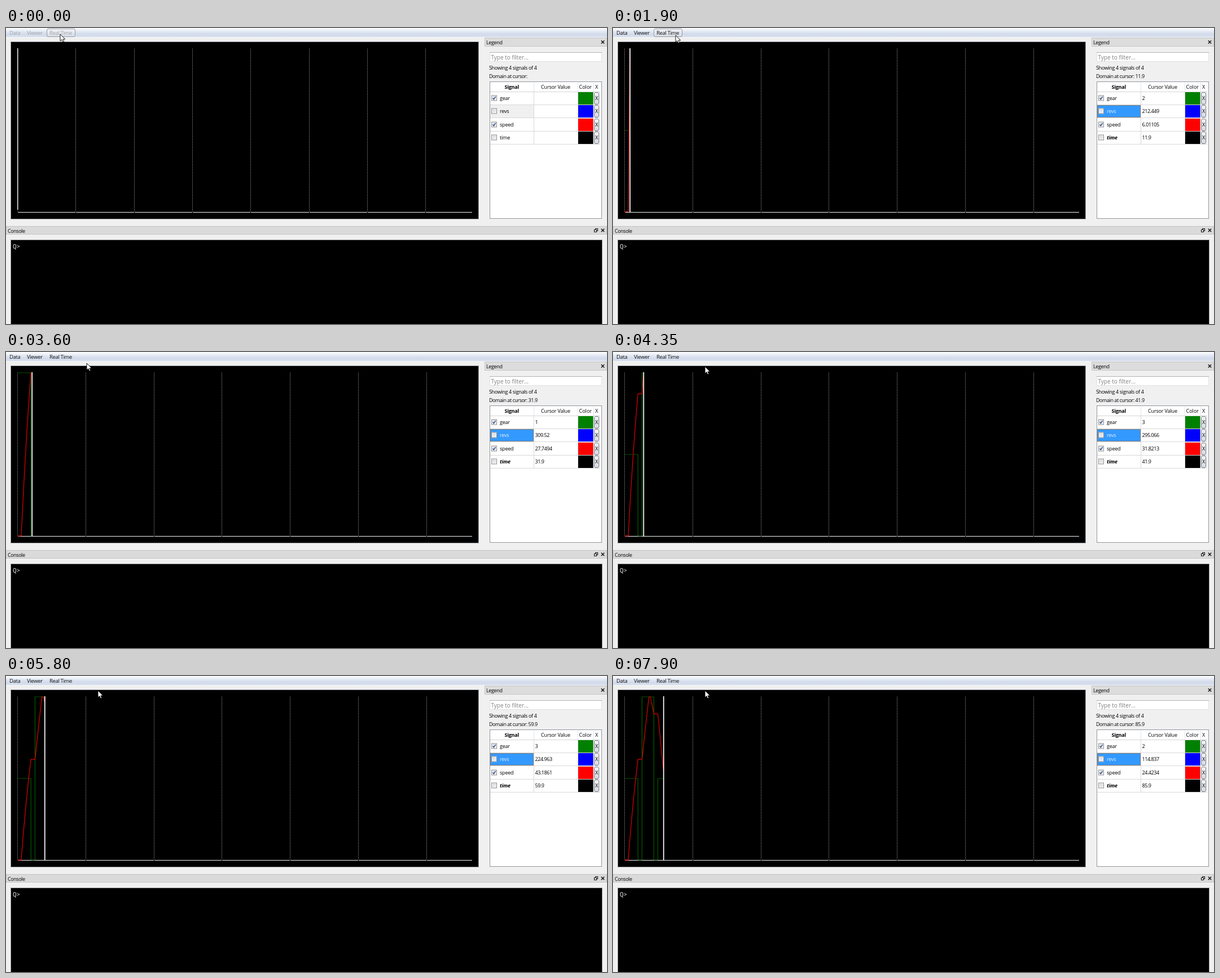
Recreate the animation shown at these times as an HTML page with a canvas. Size 1065 by 526 pixels, loop 8000 ms.

```html
<!DOCTYPE html>
<html lang="en">
<head>
<meta charset="utf-8">
<title>Real time signal viewer</title>
<style>
  html, body { margin: 0; width: 100%; height: 100%; overflow: hidden; background: #f0f0f0; }
  canvas { display: block; }
</style>
</head>
<body>
<canvas id="stage" width="1065" height="526"></canvas>
<script>
const ctx = document.getElementById('stage').getContext('2d');
const LOOP = 8000;
const UI = '"Open Sans", "Noto Sans", sans-serif';
const PLOT = { left: 20.5, right: 826, top: 37, bottom: 327, unit: 0.805 };

const clamp = (v, lo, hi) => Math.min(hi, Math.max(lo, v));

// Speed gained between two times at a given rate that fades off linearly.
function gain(t, from, to, rate, fade = 0) {
  const s = clamp(t, from, to) - from;
  return rate * s - fade * s * s;
}

// Two spells of acceleration, each followed by coasting, then two of braking.
function speed(t) {
  const driven = gain(t, 8, 29.5, 1.596831, 0.01424)
    + gain(t, 38.5, 53.65, 1.214571, 0.00498875)
    - gain(t, 57, 64.5, 0.627274)
    - gain(t, 73.2, 99, 1.250173);
  return Math.max(driven, 0.0033917 * t);
}

// The gear passes through 1 during each change.
function gear(t) {
  if (t < 29.5) return 2;
  if (t < 38.4) return 1;
  if (t < 64.5) return 3;
  return t < 73.2 ? 1 : 2;
}

const REV_KEYS = [[0, 104.719], [23.9, 321.084], [41.9, 295.066], [49.9, 308.646], [69.9, 141.279], [85.9, 114.837]];
function revs(t) {
  const i = REV_KEYS.findIndex(([end], k) => k > 0 && t <= end);
  const [t0, v0] = REV_KEYS[i - 1], [t1, v1] = REV_KEYS[i];
  return v0 + (v1 - v0) * (t - t0) / (t1 - t0);
}

// Time of the newest sample, or null before the feed starts; each update adds two units.
function feedTime(ms) {
  const n = Math.floor((ms + 24 - 2395) / 162.25);
  return n < -8 ? null : 17.9 + 2 * n;
}

function pointerAt(ms) {
  const glide = (from, to) => clamp((ms - from) / (to - from), 0, 1);
  const down = glide(300, 900), back = glide(1300, 1950), away = glide(3450, 3700);
  return [
    Math.round(96 + 4 * down + 12 * back + 51 * away),
    Math.round(11 + 13 * down - 12 * back + 14 * away)
  ];
}

function rect(x, y, w, h, fill, stroke) {
  if (fill) { ctx.fillStyle = fill; ctx.fillRect(x, y, w, h); }
  if (stroke) { ctx.strokeStyle = stroke; ctx.lineWidth = 1; ctx.strokeRect(x + 0.5, y + 0.5, w - 1, h - 1); }
}

function line(points, color, width = 1) {
  ctx.strokeStyle = color;
  ctx.lineWidth = width;
  ctx.beginPath();
  points.forEach(([x, y]) => ctx.lineTo(x, y));
  ctx.stroke();
}

function text(str, x, y, { size = 9, color = '#000', style = '', gap = -0.35, family = UI } = {}) {
  ctx.font = `${style} ${size}px ${family}`;
  ctx.letterSpacing = gap + 'px';
  ctx.fillStyle = color;
  ctx.fillText(str, x, y);
}

function gradient(y0, y1, ...colors) {
  const g = ctx.createLinearGradient(0, y0, 0, y1);
  colors.forEach((c, i) => g.addColorStop(i / (colors.length - 1), c));
  return g;
}

function button(x, y, w, h, border) {
  ctx.beginPath();
  ctx.roundRect(x + 0.5, y + 0.5, w - 1, h - 1, 2.5);
  ctx.fillStyle = gradient(y, y + h, '#f3f4f7', '#e4e7ee', '#d4d9e3');
  ctx.fill();
  ctx.strokeStyle = border;
  ctx.lineWidth = 1;
  ctx.stroke();
}

function closeMark(x, y) {
  line([[x - 2.7, y - 2.7], [x + 2.7, y + 2.7]], '#111', 1.4);
  line([[x + 2.7, y - 2.7], [x - 2.7, y + 2.7]], '#111', 1.4);
}

function drawMenu(active, hover) {
  rect(0, 0, 1065, 16, gradient(0, 16, '#ffffff', '#e6ebf5', '#d3dcec', '#d6deee'));
  rect(0, 16, 1065, 1, '#f4f5f8');
  if (hover) button(72, 1, 51, 15, '#979ba3');
  const look = { size: 9.5, color: active ? '#111' : '#a3a5a9' };
  text('Data', 6, 12, look);
  text('Viewer', 37, 12, look);
  text('Real Time', 77, 12, look);
}

function trace(signal, now, color, width) {
  const values = Array.from({ length: Math.round(now * 10) + 1 }, (_, i) => signal(i / 10));
  const min = Math.min(...values), span = Math.max(...values) - min;
  const scaleY = v => PLOT.bottom - (PLOT.bottom - PLOT.top) * (span ? (v - min) / span : 0.5);
  line(values.map((v, i) => [PLOT.left + i / 10 * PLOT.unit, scaleY(v)]), color, width);
}

function drawPlot(now) {
  rect(8, 24, 830, 316, '#000', '#a0a3a8');
  rect(21, 327, 805, 1, '#f4f4f4');
  const step = now === null ? 103.3 : 120.75;
  ctx.setLineDash([1, 1.5]);
  for (let x = PLOT.left; x < PLOT.right - 5; x += step) {
    const px = Math.floor(x) + 0.5;
    line([[px, PLOT.top], [px, PLOT.bottom]], '#b4b4b4');
    rect(px - 0.5, PLOT.bottom, 1, 1, '#000');
  }
  ctx.setLineDash([]);
  if (now === null) {
    rect(20, 36, 1.5, 287, '#eee');
    return;
  }
  trace(gear, now, '#007000', 1);
  trace(speed, now, '#e00000', 1.2);
  rect(PLOT.left + now * PLOT.unit - 0.8, 36, 1.7, 291.5, '#fff');
}

function checkbox(x, y, checked) {
  rect(x, y, 10, 10, '#f4f4f4', '#8e8f8f');
  rect(x + 2, y + 2, 6, 6, gradient(y, y + 10, '#d3d6da', '#f2f3f4'));
  if (checked) line([[x + 2.5, y + 5], [x + 4.3, y + 7.3], [x + 7.7, y + 2.3]], '#3a4f8c', 1.5);
}

function drawLegend(now, active) {
  const live = now !== null;
  rect(848, 17, 217, 16, '#dcdcdc', '#c6c6c6');
  text('Legend', 851, 29);
  closeMark(1057.5, 25);

  rect(857, 43, 199, 17, '#fff', '#dfe2e6');
  rect(857, 43, 199, 1, '#b0b3b9');
  text('Type to filter...', 859.5, 55.5, { size: 10, color: '#808080', gap: 0 });
  text('Showing 4 signals of 4', 856, 73.5);
  text('Domain at cursor:' + (live ? ' ' + now.toFixed(1) : ''), 856, 88.5, { gap: -0.45 });

  rect(857, 95, 199, 244, '#fff', '#92969d');
  text('Signal', 883.5, 107.5, { style: 'bold', gap: -0.25 });
  text('Cursor Value', 948, 107.5, { gap: -0.15 });
  text('Color', 1015.5, 107.5, { gap: 0 });
  text('X', 1044, 107.5);
  for (const x of [935, 1013, 1041]) rect(x, 97, 1, 16, '#dfe3ea');
  rect(858, 113, 195, 1, '#d2d4d8');

  const show = signal => live ? String(Number(signal(now).toPrecision(6))) : '';
  const rows = [
    ['gear', '#008000', true, show(gear)],
    ['revs', '#0000ff', false, show(revs)],
    ['speed', '#ff0000', true, show(speed)],
    ['time', '#000000', false, live ? now.toFixed(1) : '']
  ];
  rows.forEach(([name, color, checked, value], i) => {
    const y = Math.round(113 + i * 23.4), base = y + 14.8;
    const chosen = name === 'revs', selected = chosen && active;
    if (chosen) rect(858, y + 1, 77, 22, active ? '#3399ff' : '#f0f0f0');
    if (selected) {
      ctx.setLineDash([1, 1]);
      rect(858, y + 1, 77, 22, null, '#cc6600');
      ctx.setLineDash([]);
    }
    checkbox(860, y + 6.5, checked);
    text(name, 875, base, {
      style: active && name === 'time' ? 'italic bold' : '',
      color: selected ? '#e4f1ff' : '#000',
      gap: -0.2
    });
    text(value, 937.5, base, { gap: -0.45 });
    rect(858, y + 23, 195, 1, '#d8d8d8');
    rect(935, y, 1, 23, '#d8d8d8');
    rect(1013, y, 28, 23, '#d8d8d8');
    rect(1014, y + 1, 26.5, 22, color);
    button(1042, y + 1, 9, 22, '#777a80');
    text('X', 1044, base, { gap: 0 });
  });
  rect(1052, 113, 1, 94, '#e2e2e2');
}

function drawConsole() {
  rect(0, 352, 1065, 15, '#dadada', '#c4c4c4');
  text('Console', 3, 363.5, { gap: -0.45 });
  rect(1044, 356, 5, 5, null, '#111');
  rect(1042, 358, 5, 5, '#dadada', '#111');
  closeMark(1057.5, 359.5);
  rect(8, 376, 1049, 151, '#000', '#a0a3a8');
  text('Q>', 12, 391.7, { size: 11, color: '#e4e4e4', gap: 0, family: '"Noto Sans Mono", monospace' });
}

function drawPointer(x, y) {
  const shape = [[0, 0], [0, 12.2], [2.8, 9.6], [4.8, 14], [6.8, 13.1], [4.9, 8.9], [8.8, 8.9]];
  ctx.beginPath();
  shape.forEach(([dx, dy]) => ctx.lineTo(x + dx, y + dy));
  ctx.closePath();
  ctx.fillStyle = '#fff';
  ctx.fill();
  ctx.strokeStyle = '#000';
  ctx.lineWidth = 0.9;
  ctx.stroke();
}

function draw(ms) {
  const tick = Math.floor(ms / 50) * 50;
  const active = tick >= 300;
  const now = feedTime(tick);
  const [x, y] = pointerAt(tick);
  rect(0, 0, 1065, 526, '#f0f0f0');
  drawMenu(active, y < 17);
  drawPlot(now);
  drawLegend(now, active);
  drawConsole();
  drawPointer(x, y);
}

const start = performance.now();
function frame() {
  draw((performance.now() - start) % LOOP);
  requestAnimationFrame(frame);
}
frame();
</script>
</body>
</html>
```
